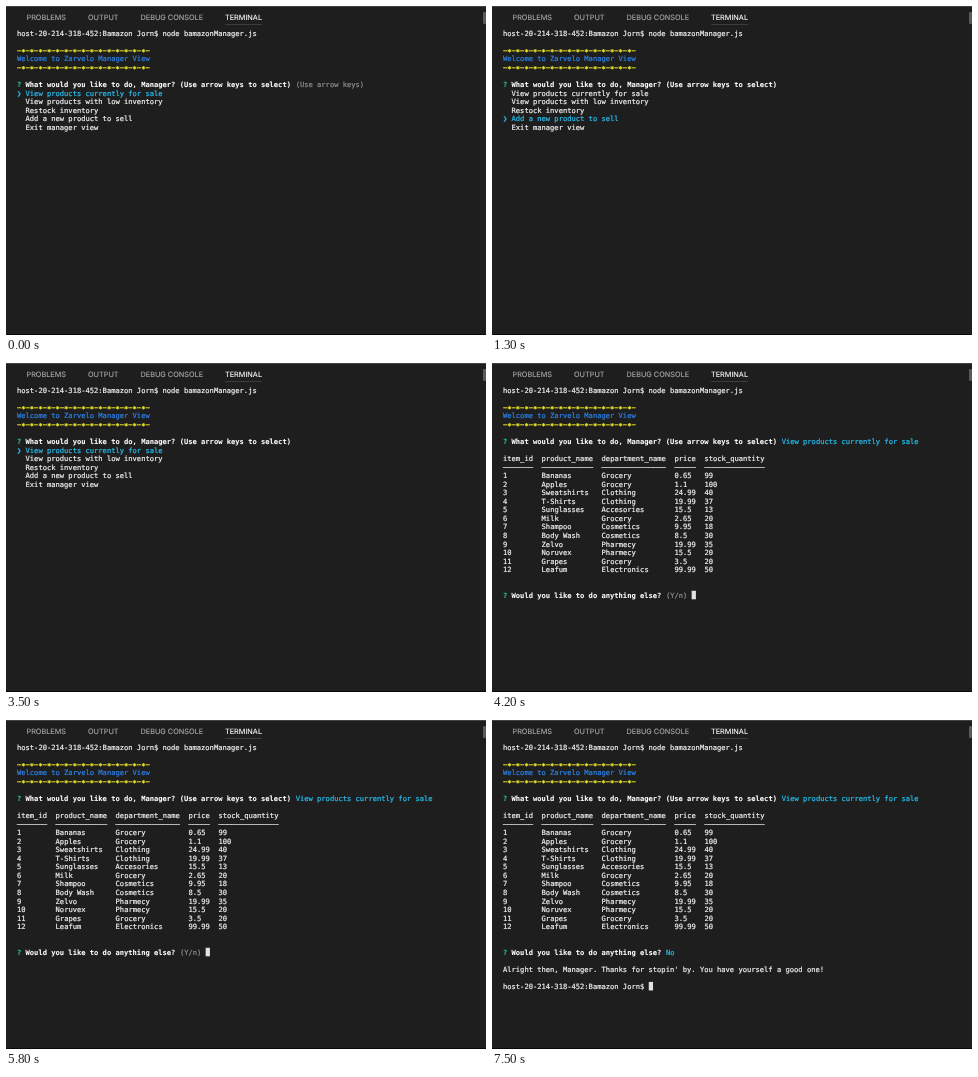
Write an HTML page that moves like this. It is 480 px wide and 329 px high and loops after 7.6 s.

```html
<!DOCTYPE html>
<html lang="en">
<head>
<meta charset="utf-8">
<title>Terminal session</title>
<style>
html, body { margin: 0; width: 100%; height: 100%; overflow: hidden; background: #1e1e1e; }
svg { display: block; width: 480px; height: 329px; }
text { white-space: pre; text-rendering: geometricPrecision; fill: currentColor; stroke: currentColor; }
.term { font: 7.12px "DejaVu Sans Mono", monospace; color: #f0f0f0; stroke-width: .22px; }
.tabs { font: 7.3px Inter, sans-serif; color: #a8a8a8; stroke-width: .12px; }
.term .bold { font-weight: bold; color: #fff; stroke-width: .08px; }
.term .green { font-weight: bold; color: #1fd0a0; stroke-width: .08px; }
.term .cyan { color: #27bdec; }
.term .blue { color: #2b80e4; }
.term .yellow { color: #f2ee28; stroke-width: .3px; }
.term .dim { color: #8c8c8c; }
.tabs .on { color: #fff; }
</style>
</head>
<body>
<svg viewBox="0 0 480 329">
  <rect width="480" height="329" fill="#1e1e1e"/>
  <rect width="480" height="1" fill="#444"/>
  <rect y="328" width="480" height="1" fill="#080808"/>
  <rect x="477" y="6" width="3" height="12" rx="1" fill="#5a5a5a"/>
  <g class="tabs">
    <text x="20.5" y="14.1">PROBLEMS</text>
    <text x="82" y="14.1">OUTPUT</text>
    <text x="134.5" y="14.1">DEBUG CONSOLE</text>
    <text x="219" y="14.1" class="on">TERMINAL</text>
    <rect x="219" y="18" width="37" height="1" fill="#3c3c3c"/>
  </g>
  <g class="term" id="term"></g>
</svg>
<script>
const LOOP = 7600, LEFT = 11, BASE = 29.8, COL = 4.287, ROW = 8.54;
const term = document.getElementById('term');
const prompt = 'host-20-214-318-452:Bamazon Jorn$ ';
const options = [
  'View products currently for sale',
  'View products with low inventory',
  'Restock inventory',
  'Add a new product to sell',
  'Exit manager view'
];
// [start time, selected option]
const moves = [[0, 0], [300, 1], [700, 2], [1000, 3], [2000, 2], [2700, 1], [3200, 0]];
const LISTED = 4000, TYPED = 6400, ANSWERED = 6700;

const starts = [0, 9, 23, 40, 47];
const heads = ['item_id', 'product_name', 'department_name', 'price', 'stock_quantity'];
const stock = `Bananas,Grocery,0.65,99
Apples,Grocery,1.1,100
Sweatshirts,Clothing,24.99,40
T-Shirts,Clothing,19.99,37
Sunglasses,Accesories,15.5,13
Milk,Grocery,2.65,20
Shampoo,Cosmetics,9.95,18
Body Wash,Cosmetics,8.5,30
Zelvo,Pharmecy,19.99,35
Noruvex,Pharmecy,15.5,20
Grapes,Grocery,3.5,20
Leafum,Electronics,99.99,50`.split('\n').map((s, i) => [i + 1, ...s.split(',')]);

const put = (row, col, str, cls = '') =>
  `<text x="${LEFT + col * COL}" y="${BASE + row * ROW}" class="${cls}">${str}</text>`;
const cells = (row, values) => values.map((v, i) => put(row, starts[i], v)).join('');
const cursor = (row, col) =>
  `<rect x="${LEFT + col * COL}" y="${BASE + row * ROW - 7}" width="${COL}" height="${ROW}" fill="#e2e2e2"/>`;
const ask = (row, str) => put(row, 0, '?', 'green') + put(row, 2, str, 'bold');

function menu(t) {
  const chosen = moves.filter(m => m[0] <= t).pop()[1];
  const hint = t < moves[1][0] ? put(6, 65, '(Use arrow keys)', 'dim') : '';
  return hint + options.map((o, i) => i === chosen
    ? put(7 + i, 0, '❯ ' + o, 'cyan')
    : put(7 + i, 2, o)).join('');
}

function table() {
  return put(6, 65, options[0], 'cyan') + cells(8, heads) +
    cells(9, heads.map(h => '─'.repeat(h.length))) +
    stock.map((r, i) => cells(10 + i, r)).join('') +
    ask(24, 'Would you like to do anything else?');
}

function answer(t) {
  if (t >= ANSWERED) return put(24, 38, 'No', 'cyan') +
    put(26, 0, "Alright then, Manager. Thanks for stopin' by. You have yourself a good one!") +
    put(28, 0, prompt) + cursor(28, prompt.length);
  const typed = t >= TYPED ? 'n' : '';
  return put(24, 38, '(Y/n)', 'dim') + put(24, 44, typed) + cursor(24, 44 + typed.length);
}

// minus and asterisk operator share one centre line
const rule = '−∗'.repeat(15) + '−';
const intro = put(0, 0, prompt + 'node bamazonManager.js') +
  put(2, 0, rule, 'yellow') + put(3, 0, 'Welcome to Zarvelo Manager View', 'blue') +
  put(4, 0, rule, 'yellow') +
  ask(6, 'What would you like to do, Manager? (Use arrow keys to select)');

let shown = '';
function draw() {
  const t = performance.now() % LOOP;
  const screen = intro + (t < LISTED ? menu(t) : table() + answer(t));
  if (screen !== shown) term.innerHTML = shown = screen;
  requestAnimationFrame(draw);
}
draw();
</script>
</body>
</html>
```
